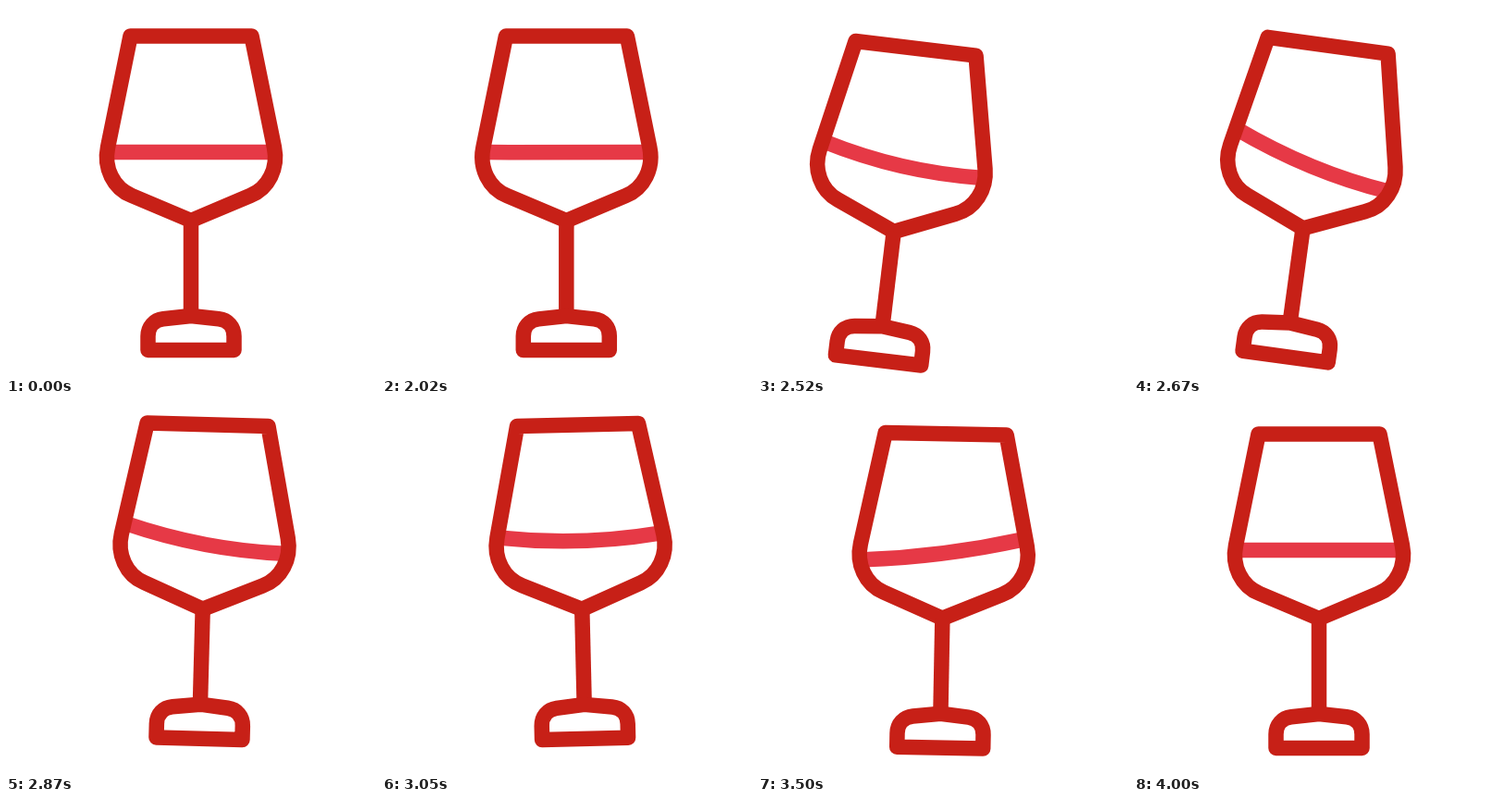
Recreate the animation shown at these times as an HTML page. Size 400 px wide and 400 px high, loop 4020 ms.

```html
<!DOCTYPE html>
<html lang="en">
<head>
<meta charset="utf-8">
<title>Swirling wine glass</title>
<style>
  html, body { margin: 0; width: 100%; height: 100%; overflow: hidden; background: #fff; }
  svg { display: block; width: 100vw; height: 100vh; }
  path { fill: none; stroke-width: 16.5; stroke-linejoin: round; }
  #wine { stroke: #e63946; }
  .glass { stroke: #c72017; }
</style>
</head>
<body>
<svg viewBox="0 0 400 400">
  <g id="drink">
    <path id="wine"/>
    <path class="glass" d="M134.5 32.5H265.5L290 153C294.5 175 284 197 264 205L200 232L136 205C116 197 105.5 175 110 153Z"/>
    <path class="glass" d="M200 232V335"/>
    <path class="glass" d="M153.5 372V357C153.5 347 160 339.5 170 338.3L200 335L230 338.3C240 339.5 246.5 347 246.5 357V372Z"/>
  </g>
</svg>
<script>
const LOOP = 4020;
const START = 2000;
const BEAT = 1000 / 3;
const drink = document.getElementById('drink');
const wine = document.getElementById('wine');

// Smooth curve from 0 at START through [time, value] keys, without overshoot.
function track(...points) {
  const keys = [[START, 0], ...points];
  const last = keys.length - 1;
  const slope = i => (keys[i + 1][1] - keys[i][1]) / (keys[i + 1][0] - keys[i][0]);
  const tangents = keys.map((_, i) => {
    if (i === 0 || i === last) return 0;
    const a = slope(i - 1), b = slope(i);
    return a * b > 0 ? 2 * a * b / (a + b) : 0;
  });
  return time => {
    if (time <= START) return 0;
    if (time >= keys[last][0]) return keys[last][1];
    const i = keys.findIndex(key => key[0] > time) - 1;
    const [t0, v0] = keys[i], [t1, v1] = keys[i + 1];
    const span = t1 - t0, s = (time - t0) / span, r = 1 - s;
    return v0 * r * r * (1 + 2 * s) + v1 * s * s * (3 - 2 * s)
      + span * s * r * (tangents[i] * r - tangents[i + 1] * s);
  };
}

const beat = n => START + n * BEAT;

// The glass circles once, leaning and wobbling back upright.
const shiftX = track([beat(1), -56], [2520, -49.5], [beat(2), -13.7], [2950, 17], [3500, 0]);
const shiftY = track([2440, 12.8], [beat(2), 8.8], [2910, -11.5], [3560, 0]);
const lean = track([beat(2), 7.8], [beat(3), -1.6], [beat(4), 2.2], [beat(5), 0]);

// The wine surface sloshes: rise towards the right, and sag in the middle.
const slosh = track([beat(1), -10], [beat(2), 22.5], [beat(4), -15], [beat(6), 0]);
const sag = track([beat(1), 7], [beat(4), 5], [beat(6), 0]);

function draw(time) {
  const rise = slosh(time), dip = sag(time);
  const level = 158 + 0.28 * Math.abs(rise);
  wine.setAttribute('d',
    `M114 ${level - rise - dip}Q200 ${level + dip} 286 ${level + rise - dip}`);
  drink.setAttribute('transform',
    `translate(${shiftX(time)} ${shiftY(time)}) rotate(${lean(time)} 200 200)`);
}

const start = performance.now();
function frame() {
  draw((performance.now() - start) % LOOP);
  requestAnimationFrame(frame);
}
frame();
</script>
</body>
</html>
```
